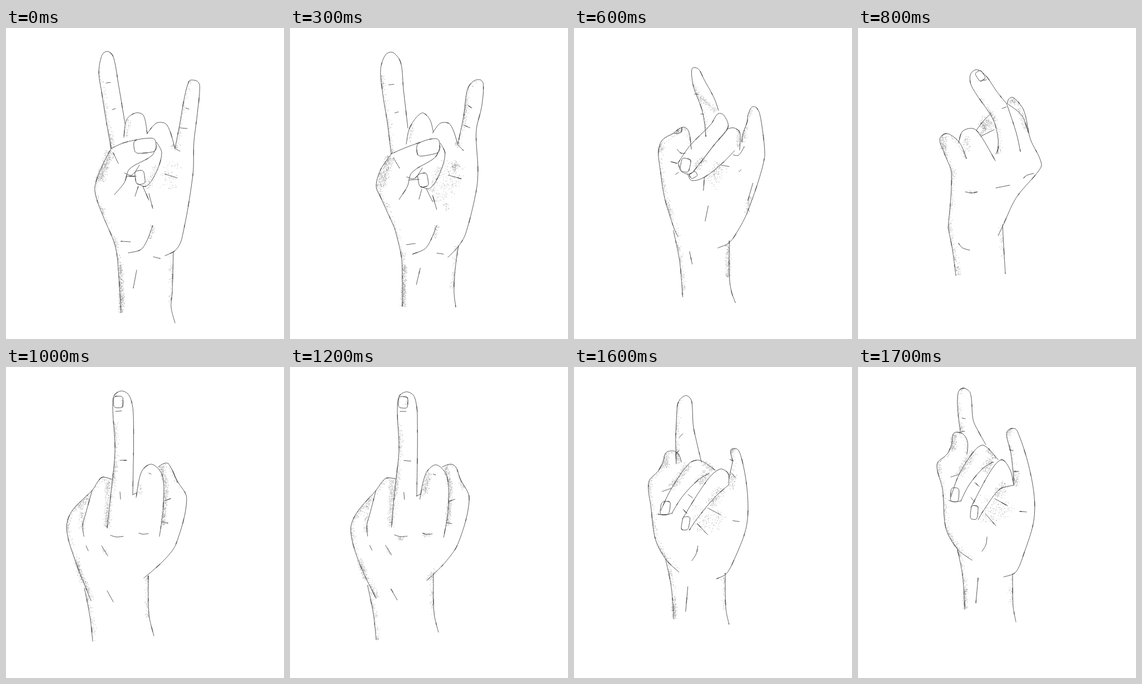
Recreate the animation shown at these times as an HTML page. Size 500 px wide and 560 px high, loop 1.8 s.

```html
<!DOCTYPE html>
<html lang="en">
<head>
<meta charset="utf-8">
<title>Hand signs</title>
<style>
html, body { margin: 0; width: 100%; height: 100%; overflow: hidden; background: #fff; }
svg { display: block; width: 500px; height: 560px; }
path { fill: none; stroke-linecap: round; stroke-linejoin: round; }
.line { stroke: #505050; stroke-width: .95; }
.press { stroke: #3c3c3c; stroke-width: 1.3; stroke-dasharray: 9 34 4 47; opacity: .75; }
.grain { stroke: #777; stroke-width: .9; stroke-linecap: butt; opacity: .62; }
</style>
</head>
<body>
<svg id="stage" viewBox="0 0 500 560"></svg>
<script>
const numbers = text => text.split(' ').map(Number);
const mix = (a, b, t) => a + (b - a) * t;

function points(text) {
  const n = numbers(text), out = [];
  for (let i = 0; i < n.length; i += 2) out.push([n[i], n[i + 1]]);
  return out;
}

// Edges morph from pose to pose; lines and tones ride along with them
class Pose {
  constructor(base) {
    this.edges = {};
    this.lines = [];
    this.tones = [];
    this.base = base || this;
  }
  edge(key, text) { this.edges[key] = points(text); return this; }
  draw(...texts) { this.lines.push(...texts.map(points)); return this; }
  // Rounded box: centre, width, height, tilt in degrees
  nail(text) {
    const [x, y, w, h, deg] = numbers(text), r = deg * Math.PI / 180, round = v => Math.sign(v) * Math.abs(v) ** .5;
    this.lines.push(Array.from({ length: 17 }, (_, i) => {
      const a = i * Math.PI / 8, u = round(Math.cos(a)) * w / 2, v = round(Math.sin(a)) * h / 2;
      return [x + u * Math.cos(r) - v * Math.sin(r), y + u * Math.sin(r) + v * Math.cos(r)];
    }));
    return this;
  }
  // Pencil patch: width, density, start, end
  tone(text) { this.tones.push(numbers(text)); return this; }
}

const horns = new Pose()
  .edge('idx', '189 217 179 160 172 115 167 80 173 48 183 42 193 52 202 100 214 172')
  .edge('left', '189 217 172 250 160 285 163 308 178 347')
  .edge('wl', '178 347 197 395 203 450 207 513')
  .edge('right', '304 217 313 170 322 120 330 95 338 94 348 100 344 155 338 205 336 265 316 380 305 400 286 410')
  .edge('wr', '301 403 299 475 297 503 304 531')
  .edge('mid', '212 197 217 165 233 153 247 157 254 190')
  .draw('254 190 271 171 289 174 304 217', '189 217 211 207 235 201', '271 212 262 230 222 254 213 278 195 300')
  .draw('213 261 226 265 240 247', '216 267 234 267', '236 280 252 285 270 260 280 225 271 206')
  .nail('250 212 40 26 -6').nail('241 269 17 25 -8')
  .draw('180 99 188 98', '191 147 197 145', '323 144 329 146', '314 180 326 181', '286 263 308 270', '207 384 224 385')
  .draw('265 412 277 415', '220 405 245 397 264 356', '235 436 229 468', '193 225 202 244', '238 285 232 303')
  .draw('246 285 257 310', '257 298 264 325', '306 218 313 222')
  .tone('14 .7 187 222 168 275').tone('8 .8 206 425 207 512').tone('8 .8 298 210 307 217')
  .tone('24 .1 300 240 290 290').tone('12 .25 252 290 270 248').tone('7 .45 264 355 259 380').tone('8 .3 221 165 216 195');

const horns2 = new Pose(horns)
  .edge('idx', '182 227 175 170 167 120 163 75 172 48 185 44 199 62 204 110 212 180')
  .edge('left', '182 227 163 255 155 285 164 307 188 360')
  .edge('wl', '188 360 200 410 202 450 202 501')
  .edge('right', '302 208 312 160 318 115 325 100 337 93 347 97 345 140 335 185 338 255 335 293 316 370 303 393 284 413')
  .edge('wr', '303 392 297 435 295 475 298 502')
  .edge('mid', '209 209 216 178 237 153 251 164 258 188')
  .tone('13 .6 302 243 292 253').tone('30 .12 290 240 268 315').tone('7 .45 278 316 284 328');

const loose = new Pose()
  .edge('idx', '230 180 222 135 211 95 213 66 219 57 232 68 236 95 252 130 256 154')
  .edge('left', '219 210 217 174 208 167 198 175 188 190 160 203 149 230 157 300 187 367 200 384')
  .edge('wl', '187 367 200 430 205 503')
  .edge('right', '318 240 321 185 319 160 326 128 335 121 346 132 350 170 347 250 328 340 300 390 285 403 262 407')
  .edge('wr', '289 398 288 470 293 500 303 521')
  .draw('190 243 215 205 245 167 257 156 270 156 281 178 255 210 225 252 213 265 196 260 190 243')
  .draw('281 181 294 182 307 198 310 238', '281 181 255 210 232 243', '208 265 216 278 240 272 275 246 298 231', '201 171 200 182 189 188')
  .nail('204 247 18 28 12').nail('219 267 14 11 -30')
  .draw('212 107 219 109', '222 143 228 144', '175 241 188 244', '190 216 197 223 205 222', '270 250 287 255', '295 237 307 243 320 238')
  .draw('249 328 244 357', '240 273 239 298', '217 412 222 437', '333 282 326 317', '306 265 310 262', '184 266 190 262')
  .tone('9 .5 223 115 253 152').tone('6 .8 198 174 192 187').tone('9 .5 155 210 162 218').tone('8 .5 285 405 286 470')
  .tone('8 .45 330 308 324 345').tone('12 .6 240 235 222 252').tone('14 .3 268 245 255 275').tone('26 .1 280 255 250 285').tone('6 .5 303 190 307 232');

const turned = new Pose()
  .edge('idx', '251 226 252 200 243 165 210 115 202 98 203 82 214 75 230 86 250 115 268 137')
  .edge('left', '195 235 185 210 172 196 158 190 147 200 155 225 168 262 162 360')
  .edge('wl', '162 360 170 400 176 446')
  .edge('right', '268 137 271 128 279 125 298 148 310 200 327 235 329 251 285 305 261 355 252 374')
  .edge('wr', '260 354 263 410 265 442')
  .draw('181 207 188 186 207 181 220 193 247 239', '213 184 225 168 240 153', '221 195 245 183', '268 138 285 190 292 222', '270 137 295 158 306 188')
  .nail('220 86 13 18 -32')
  .draw('193 295 205 297 215 295', '248 288 273 283', '181 388 188 396 201 400', '298 270 304 265 316 262', '259 145 267 142', '253 214 248 227', '226 95 231 93')
  .tone('10 .7 153 196 154 218').tone('20 .8 236 165 225 182').tone('7 .7 218 192 230 180').tone('10 .35 194 195 196 222')
  .tone('8 .8 274 130 284 134').tone('7 .4 288 145 303 185').tone('5 .8 200 296 213 296').tone('8 .5 178 430 180 445');

const finger = new Pose()
  .edge('idx', '182 290 190 215 196 150 192 75 194 52 208 43 222 52 229 85 228 230')
  .edge('left', '190 202 172 199 155 222 118 260 109 292 125 350 153 421')
  .edge('wl', '141 398 151 450 156 494')
  .edge('right', '274 180 283 174 292 174 308 205 325 237 306 318 285 347 248 380')
  .edge('wr', '256 376 257 445 266 484')
  .edge('knuckle', '234 235 244 188 262 175 281 195 283 250 276 305')
  .draw('155 222 143 265 138 285 140 305', '197 80 208 79', '228 230 236 226').nail('202 63 17 21 0')
  .draw('205 168 217 168', '205 225 206 238', '188 303 198 306 211 305', '239 299 246 301 256 300', '285 241 296 237', '280 279 291 281')
  .draw('172 322 183 340', '144 322 148 331', '182 403 193 423', '257 191 261 193', '303 195 308 207')
  .tone('9 .6 184 203 180 288').tone('9 .5 148 233 132 255').tone('8 .35 136 260 136 298').tone('8 .7 125 348 138 388')
  .tone('8 .8 279 180 288 215').tone('7 .85 288 215 282 285').tone('7 .3 239 205 241 230').tone('6 .3 207 72 210 56').tone('5 .4 173 326 181 338');

const finger2 = new Pose(finger)
  .edge('idx', '183 287 188 215 196 150 194 85 198 54 212 46 226 56 229 115 228 235')
  .edge('left', '188 200 172 202 152 225 120 268 109 295 122 350 156 412')
  .edge('wl', '138 388 149 440 154 489')
  .edge('right', '274 180 290 177 301 181 306 200 320 235 302 310 275 355 245 388')
  .edge('wr', '260 368 261 440 268 471')
  .edge('knuckle', '233 241 245 195 264 177 284 200 286 260 277 308')
  .tone('10 .6 250 190 242 228').tone('5 .9 194 309 206 310').tone('7 .5 238 304 252 301').tone('8 .5 262 365 246 385');

const open = new Pose()
  .edge('idx', '184 118 179 70 181 44 190 38 202 47 207 95 216 115 230 140')
  .edge('left', '196 157 197 135 188 120 172 119 168 140 160 157 142 175 152 220 158 290 178 327 205 348')
  .edge('wl', '178 325 188 375 192 436')
  .edge('right', '281 212 275 155 267 120 274 111 286 114 312 200 317 270 297 340 283 370 262 378')
  .edge('wr', '278 373 279 430 284 459')
  .draw('167 234 182 193 210 150 226 141 252 167', '185 241 200 212 225 182 243 171', '203 253 240 185 259 167 274 186 280 213')
  .draw('216 275 228 255 255 220 280 213', '163 240 173 243 186 241').nail('174 230 15 25 4').nail('209 262 13 25 6')
  .draw('187 92 193 93', '186 116 192 116', '272 149 279 151', '281 188 289 188', '291 260 303 261', '246 237 269 250', '229 264 248 286')
  .draw('232 306 230 320 223 332', '216 380 212 425', '210 208 218 215', '167 198 180 194', '203 235 210 243')
  .tone('9 .5 171 122 172 152').tone('12 .6 208 153 180 195').tone('7 .8 192 400 192 436').tone('14 .6 240 168 225 188')
  .tone('9 .7 233 148 247 165').tone('16 .45 266 210 248 232').tone('34 .12 240 232 235 280').tone('22 .12 272 245 255 270').tone('9 .4 284 185 286 215');

const cycle = [[0, horns], [3, horns2], [5, loose], [8, turned], [10, finger], [14, finger2], [17, open], [18, horns]];
const COUNT = 18, STEP = 100, SAMPLES = 64;
const stage = document.getElementById('stage');

// Edges that get shading: share of the stroke, and the side it lies on
const shaded = { idx: [.42, 1], left: [1, -1], wl: [1, -1], right: [.26, 1], wr: [.7, 1] };

function rng(seed) {
  let s = seed * 7919 + 17;
  return () => (s = (s * 16807) % 2147483647) / 2147483647;
}

// Bezier controls for a curve through the points
function spans(p) {
  return p.slice(1).map((c, i) => {
    const b = p[i], a = p[i - 1] || b, d = p[i + 2] || c;
    // Handles scale with the span so uneven spacing stays smooth
    const len = (m, n) => Math.hypot(n[0] - m[0], n[1] - m[1]) || 1;
    const l = len(b, c), ka = l / (len(a, b) + l) / 3, kd = l / (len(c, d) + l) / 3;
    const k1 = a === b ? 1 / 6 : ka, k2 = d === c ? 1 / 6 : kd;
    return [b, [0, 1].map(k => b[k] + (c[k] - a[k]) * k1), [0, 1].map(k => c[k] - (d[k] - b[k]) * k2), c];
  });
}

function curve(p) {
  const pair = q => q[0].toFixed(1) + ' ' + q[1].toFixed(1);
  return 'M' + pair(p[0]) + spans(p).map(s => 'C' + s.slice(1).map(pair).join(' ')).join('');
}

// Evenly spaced points along the curve
function resample(p) {
  const fine = [p[0]], at = [0], out = [];
  for (const s of spans(p)) {
    for (let j = 1; j <= 10; j++) {
      const t = j / 10, u = 1 - t;
      fine.push([0, 1].map(k => u ** 3 * s[0][k] + 3 * u * u * t * s[1][k] + 3 * u * t * t * s[2][k] + t ** 3 * s[3][k]));
    }
  }
  for (let i = 1; i < fine.length; i++) at.push(at[i - 1] + Math.hypot(fine[i][0] - fine[i - 1][0], fine[i][1] - fine[i - 1][1]));
  for (let k = 0, i = 1; k <= SAMPLES; k++) {
    const d = at[at.length - 1] * k / SAMPLES;
    while (i < fine.length - 1 && at[i] < d) i++;
    const t = (d - at[i - 1]) / (at[i] - at[i - 1] || 1);
    out.push([0, 1].map(n => mix(fine[i - 1][n], fine[i][n], t)));
  }
  return out;
}

// side 0 spreads both ways, otherwise the grain stays on one side
function grain([x, y], b, width, density, side, rand) {
  const dx = b[0] - x, dy = b[1] - y, len = Math.hypot(dx, dy) || 1;
  let d = '';
  for (let n = len * width * density * .62 - rand(); n > 0; n--) {
    const t = rand(), o = side ? side * rand() * rand() * width : (rand() + rand() - 1) * width * .75;
    d += `M${(x + dx * t - dy / len * o).toFixed(1)} ${(y + dy * t + dx / len * o).toFixed(1)}h${(.5 + rand() * .9).toFixed(1)}`;
  }
  return d;
}

function build(f) {
  let i = 0;
  while (f >= cycle[i + 1][0]) i++;
  const [f0, from] = cycle[i], [f1, to] = cycle[i + 1], t = (f - f0) / (f1 - f0);
  const near = t < .5 ? from : to, base = near.base;
  const lines = [], pulls = [], rand = rng(f + 1);
  let dots = '';

  for (const key in near.edges) {
    const own = resample(near.edges[key]), a = from.edges[key], b = to.edges[key];
    let now = own;
    if (a && b) {
      const p = resample(a), q = resample(b);
      now = p.map((v, k) => [mix(v[0], q[k][0], t), mix(v[1], q[k][1], t)]);
    }
    lines.push(now);
    if (base.edges[key]) resample(base.edges[key]).forEach((v, k) => pulls.push([...v, now[k][0] - v[0], now[k][1] - v[1]]));
    if (shaded[key]) {
      const [share, side] = shaded[key], phase = rand() * 6;
      for (let k = 0; k < share * SAMPLES; k++) {
        const wave = Math.sin(k * .21 + phase) + Math.sin(k * .47 + phase * 2);
        dots += grain(now[k], now[k + 1] || now[k], 9, .1 + Math.max(0, wave) * .3, side, rand);
      }
    }
  }

  // Move a point the way the edges around it have moved
  const carry = ([x, y]) => {
    let sx = 0, sy = 0, sum = 0;
    for (const [px, py, dx, dy] of pulls) {
      const w = 1 / ((px - x) ** 2 + (py - y) ** 2 + 20);
      sx += dx * w; sy += dy * w; sum += w;
    }
    return [x + sx / sum, y + sy / sum];
  };

  for (const p of base.lines) lines.push(p.map(carry));
  for (const [w, d, x, y, u, v] of base.tones) dots += grain(carry([x, y]), carry([u, v]), w, d, 0, rand);
  if (near !== base) for (const [w, d, x, y, u, v] of near.tones) dots += grain([x, y], [u, v], w, d, 0, rand);

  const ink = lines.map(curve);
  const press = ink.map((d, k) => `<path class="press" stroke-dashoffset="${(k * 37 + f * 23) % 94}" d="${d}"/>`).join('');
  return `<path class="grain" d="${dots}"/><path class="line" d="${ink.join('')}"/>${press}`;
}

const frames = Array.from({ length: COUNT }, (_, f) => build(f));
let shown = -1;

function draw(ms) {
  const f = Math.floor(ms / STEP) % COUNT;
  if (f !== shown) stage.innerHTML = frames[shown = f];
}

const start = performance.now();
function tick() {
  draw(performance.now() - start);
  requestAnimationFrame(tick);
}
tick();
</script>
</body>
</html>
```
